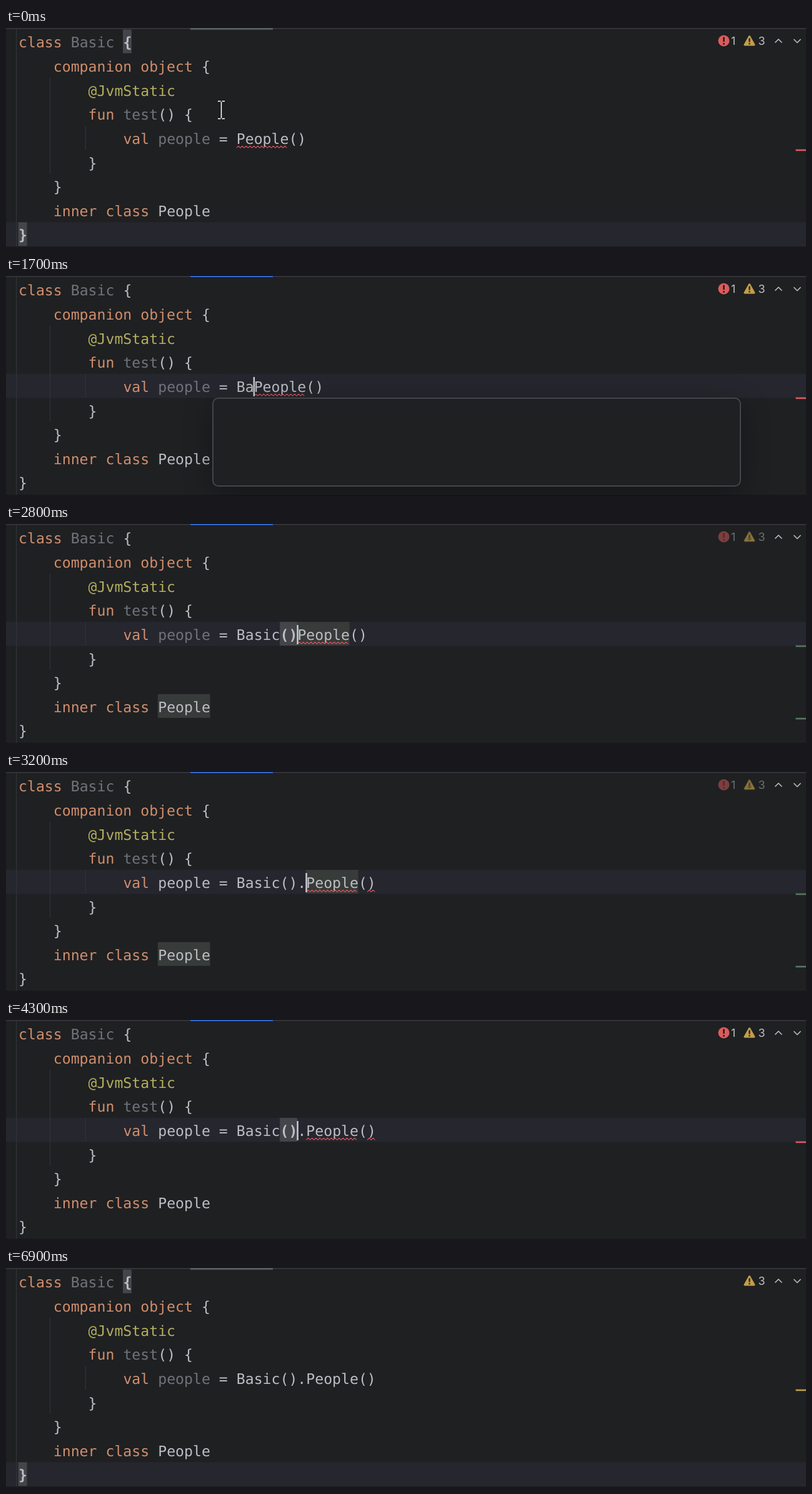
An HTML page with a canvas that plays this animation: 1280 by 353 pixels, repeating every 7 s.

```html
<!DOCTYPE html>
<html lang="en">
<head>
<meta charset="utf-8">
<title>Code editor</title>
<style>
  html, body { margin: 0; width: 100%; height: 100%; overflow: hidden; background: #1f2022; }
  canvas { display: block; width: 100%; height: 100%; }
</style>
</head>
<body>
<canvas id="stage" width="1280" height="353"></canvas>
<script>
const ctx = document.getElementById('stage').getContext('2d');
const W = 1280, H = 353, LOOP = 7000, STEP = 100;
const CHAR = 13.95, LEFT = 20, LINE = 38.66, TOP = 2.4;
const MONO = '23.17px "DejaVu Sans Mono", monospace';
const UI = 'Inter, sans-serif';
const C = {
  bg: '#1f2022', row: '#26262e', text: '#bcbec4', keyword: '#cf8e6d', note: '#b3ae60',
  muted: '#6f737a', guide: '#313438', match: '#43454a', usage: '#373b39', blue: '#548af7',
  red: '#db5c5c', yellow: '#c29e4a', green: '#57765f', popup: '#2b2d30'
};

// Each entry changes the editor state from its time on.
const timeline = [
  [0, { typed: '', row: 8, caret: null, braces: true, focus: false, tab: 2.7, usages: false, parens: false,
        light: false, error: true, dim: false, popup: null, mouse: [344.5, 131.5] }],
  [100, { mouse: [352, 146] }],
  [200, { mouse: [366, 168] }],
  [300, { mouse: [373, 179] }],
  [500, { row: 4, caret: 25, braces: false, focus: true }],
  [700, { usages: true }],
  [1100, { typed: 'B', caret: 26, tab: 1.6, usages: false, mouse: null }],
  [1500, { typed: 'Ba', caret: 27 }],
  [1700, { popup: 'empty' }],
  [1800, { popup: 'classes' }],
  [1900, { typed: 'Bas', caret: 28 }],
  [2000, { typed: 'Basi', caret: 29 }],
  [2100, { typed: 'Basic', caret: 30 }],
  [2300, { typed: 'Basic()', caret: 32, popup: null }],
  [2500, { dim: true }],
  [2700, { parens: true, usages: true }],
  [3100, { typed: 'Basic().', caret: 33, parens: false }],
  [3200, { light: true }],
  [3300, { popup: 'members' }],
  [3800, { caret: 34 }],
  [4000, { popup: null }],
  [4100, { caret: 32, dim: false }],
  [4300, { usages: false, parens: true }],
  [4500, { caret: 31 }],
  [4800, { light: false, error: false, errorCount: true, tab: 2.7 }],
  [5000, { errorCount: false }],
  [5200, { mouse: [345, 212] }],
  [5300, { mouse: [268, 297] }],
  [5400, { mouse: [400, 332] }],
  [5500, { mouse: [545, 343], row: 8, caret: 1, parens: false, braces: true }],
  [5600, { mouse: [582, 344] }],
  [5900, { mouse: [545, 347] }],
  [6000, { mouse: [497, 352] }],
  [6100, { mouse: null }],
  [6600, { caret: null }],
  [6900, { focus: false }]
];

const colX = col => LEFT + col * CHAR;
const rowY = row => TOP + row * LINE;

function rect(x, y, w, h, color) {
  ctx.fillStyle = color;
  ctx.fillRect(x, y, w, h);
}

function rounded(x, y, w, h, r, color) {
  ctx.beginPath();
  ctx.roundRect(x, y, w, h, r);
  ctx.fillStyle = color;
  ctx.fill();
}

function disc(x, y, r, color) {
  ctx.beginPath();
  ctx.arc(x, y, r, 0, Math.PI * 2);
  ctx.fillStyle = color;
  ctx.fill();
}

function line(points, color, width) {
  ctx.beginPath();
  points.forEach(([x, y]) => ctx.lineTo(x, y));
  ctx.strokeStyle = color;
  ctx.lineWidth = width;
  ctx.stroke();
}

function text(str, x, y, color, font = MONO, align = 'left') {
  ctx.font = font;
  ctx.textAlign = align;
  ctx.fillStyle = color;
  ctx.fillText(str, x, y);
}

const bold = (str, x, y, color) => text(str, x, y, color, 'bold ' + MONO);

// Draws [text, color] pairs one after another on the character grid.
function code(row, col, ...tokens) {
  for (const [str, color = C.text] of tokens) {
    text(str, colX(col), rowY(row) + 28.8, color);
    col += str.length;
  }
}

function cellBox(row, col, count, color) {
  rect(colX(col) - 0.4, rowY(row), count * CHAR, LINE - 0.6, color);
}

function matched(row, col, str) {
  cellBox(row, col, str.length, C.match);
  bold(str, colX(col), rowY(row) + 28.8, C.text);
}

function squiggle(col, count) {
  const start = colX(col), end = start + count * CHAR, points = [];
  for (let x = start, i = 0; x <= end; x += 3.1, i++) points.push([x, i % 2 ? 189.3 : 192.3]);
  line(points, '#d9565f', 1.1);
}

function drawCode(s) {
  const target = 25 + s.typed.length;
  rect(0, rowY(s.row), W, LINE, C.row);
  rect(16, 0, 1.2, H, C.guide);
  rect(70, 80, 1.2, 154, C.guide);
  rect(126.5, 157, 1.2, 38, C.guide);
  if (s.usages) {
    cellBox(4, target, 6, C.usage);
    cellBox(7, 16, 6, C.usage);
  }
  code(0, 0, ['class ', C.keyword], ['Basic ', C.muted], [s.braces ? '' : '{']);
  code(1, 4, ['companion object ', C.keyword], ['{']);
  code(2, 8, ['@JvmStatic', C.note]);
  code(3, 8, ['fun ', C.keyword], ['test', C.muted], ['() {']);
  code(4, 12, ['val ', C.keyword], ['people', s.light ? C.text : C.muted], [' = ']);
  if (s.parens) {
    code(4, 25, ['Basic']);
    matched(4, 30, '()');
    code(4, 32, [s.typed.slice(7) + 'People()']);
  } else {
    code(4, 25, [s.typed + 'People()']);
  }
  code(5, 8, ['}']);
  code(6, 4, ['}']);
  code(7, 4, ['inner class ', C.keyword], ['People']);
  if (s.braces) {
    matched(0, 12, '{');
    matched(8, 0, '}');
  } else {
    code(8, 0, ['}']);
  }
  if (s.error) {
    squiggle(target, 6);
    if (s.light) squiggle(target + 7, 1);
  }
  if (s.caret !== null) rect(colX(s.caret) - 1, rowY(s.row) + 5, 2.4, 31, '#ced0d6');
}

function drawChrome(s) {
  rect(0, 0, W, 1.5, '#393b40');
  rect(295, 0, 132, s.tab, s.focus ? '#3574f0' : '#5a5d63');
  rect(0, 351, W, 2, '#1c1719');

  ctx.globalAlpha = s.dim ? 0.5 : 1;
  const count = '18px ' + UI;
  if (s.error || s.errorCount) {
    disc(1148.5, 20.5, 9, C.red);
    rect(1147.2, 14.5, 2.6, 7.5, C.bg);
    rect(1147.2, 24, 2.6, 2.6, C.bg);
    text('1', 1160, 27.3, C.text, count);
  }
  ctx.lineJoin = 'round';
  ctx.beginPath();
  [[1189.5, 13.5], [1197, 27], [1182, 27]].forEach(([x, y]) => ctx.lineTo(x, y));
  ctx.closePath();
  ctx.fillStyle = ctx.strokeStyle = C.yellow;
  ctx.lineWidth = 3;
  ctx.fill();
  ctx.stroke();
  rect(1188.4, 16.5, 2.3, 6, C.bg);
  rect(1188.4, 24, 2.3, 2.3, C.bg);
  text('3', 1203.5, 27.3, C.text, count);
  ctx.globalAlpha = 1;
  line([[1230.5, 23.5], [1236, 18], [1241.5, 23.5]], C.text, 1.6);
  line([[1260.5, 18], [1266, 23.5], [1271.5, 18]], C.text, 1.6);

  rect(1263.5, 194.7, 16.5, 2.6, s.usages ? C.green : s.error ? C.red : C.yellow);
  if (s.usages) rect(1263.5, 311, 16.5, 2.6, C.green);
}

function classIcon(x, y) {
  ctx.beginPath();
  ctx.arc(x, y, 9.3, 0, Math.PI * 2);
  ctx.fillStyle = '#25324d';
  ctx.fill();
  ctx.strokeStyle = C.blue;
  ctx.lineWidth = 1.7;
  ctx.stroke();
  ctx.beginPath();
  ctx.arc(x, y, 4.3, 0.8, Math.PI * 2 - 0.8);
  ctx.stroke();
  rect(x + 2.5, y + 2.5, 10, 10, C.match);
  rect(x + 4, y + 4, 7, 7, '#a571e6');
}

function libraryIcon(x, y) {
  ctx.beginPath();
  [[0, -11], [9, -11], [9, 0], [-6, 0], [-6, -5]].forEach(([dx, dy]) => ctx.lineTo(x + dx, y + dy));
  ctx.fillStyle = '#9a9da3';
  ctx.fill();
  line([[x - 6, y - 4], [x + 1, y - 4], [x + 1, y - 11]], C.popup, 1.5);
  rect(x - 10, y, 21, 11, '#3b86a8');
  text('01', x, y + 9.5, '#1c303b', 'bold 10px "DejaVu Sans Mono", monospace', 'center');
}

function stampIcon(x, y) {
  ctx.beginPath();
  ctx.arc(x, y - 5, 3.8, 2.2, Math.PI * 2 + 0.9);
  ctx.strokeStyle = '#ced0d6';
  ctx.lineWidth = 1.7;
  ctx.stroke();
  line([[x - 2.2, y - 2], [x - 2.2, y + 1.5], [x - 8.5, y + 1.5], [x - 8.5, y + 5],
        [x + 8.5, y + 5], [x + 8.5, y + 1.5], [x + 2.2, y + 1.5], [x + 2.2, y - 2]], '#ced0d6', 1.7);
  line([[x - 9.5, y + 8.5], [x + 9.5, y + 8.5]], '#ced0d6', 1.7);
}

function panel(x, y, w, h, color) {
  ctx.save();
  ctx.shadowColor = 'rgba(0,0,0,0.35)';
  ctx.shadowBlur = 45;
  ctx.shadowOffsetY = 10;
  rounded(x, y, w, h, 9, color);
  ctx.restore();
  ctx.strokeStyle = C.match;
  ctx.lineWidth = 2;
  ctx.stroke();
}

const TAIL_GAP = 2.5;

function classPopup(prefix, filled) {
  panel(331, 196, 844, filled ? 400 : 141, filled ? C.popup : C.bg);
  if (!filled) return;
  rounded(335, 200.5, 835, 34.5, 6, C.match);
  rect(1162, 201, 12, 61, '#4e5053');
  const items = ['Basic (<root>)', 'BasicStroke (java.awt)', 'BasicPermission (java.security)',
    'BasicFileAttributes (java.nio.file.attribute)', 'BasicBorders (javax.swing.plaf.basic)'];
  items.forEach((item, i) => {
    const [name, origin] = item.split(' '), y = 226.5 + i * 34.5, n = prefix.length;
    if (i) libraryIcon(358.5, y - 8.5); else classIcon(357.5, y - 9);
    text(name.slice(0, n), 375, y, C.blue);
    text(name.slice(n), 375 + n * CHAR, y, C.text);
    text(origin, 375 + (name.length + 1) * CHAR + TAIL_GAP, y, C.muted);
  });
}

function memberPopup(hasPrefix) {
  panel(442, 196, 860, 107, C.popup);
  rounded(446, 200.5, 850, 34.5, 6, C.match);
  classIcon(469.5, 217.5);
  bold('P', 486.5, 226.5, hasPrefix ? C.blue : C.text);
  bold('eople', 486.5 + CHAR, 226.5, C.text);
  text('()', 486.5 + 6 * CHAR + TAIL_GAP, 226.5, C.muted);
  text('Basic.People', 1262, 226.5, C.muted, MONO, 'right');
  stampIcon(469.5, 252.5);
  text('par', 486.5, 261, C.text);
  text('(expr)', 1262, 261, C.muted, MONO, 'right');
  rounded(443, 270, 850, 32, [0, 0, 8, 8], '#303236');
  const hint = '17.38px ' + UI;
  text('Press Ctrl+. to choose the selected (or first) suggestion and insert a dot afterwards',
    458, 292.3, C.muted, hint);
  text('Next Tip', 1149, 292.3, C.blue, hint);
  [280, 286.5, 293].forEach(y => disc(1261, y, 1.6, '#ced0d6'));
}

function drawMouse([x, y]) {
  const beam = (color, width) => {
    line([[x, y - 13], [x, y + 13]], color, width);
    for (const end of [-14, 14]) {
      line([[x - 5.5, y + end], [x - 1, y + end]], color, width);
      line([[x + 1, y + end], [x + 5.5, y + end]], color, width);
    }
  };
  beam('#08090a', 4);
  beam('#f4f4f4', 1.8);
}

function render(time) {
  const now = Math.floor((time % LOOP) / STEP) * STEP;
  const state = Object.assign({}, ...timeline.filter(([at]) => at <= now).map(([, change]) => change));
  ctx.textRendering = 'geometricPrecision';
  rect(0, 0, W, H, C.bg);
  drawCode(state);
  drawChrome(state);
  if (state.popup === 'members') memberPopup(state.caret === 34);
  else if (state.popup) classPopup(state.typed, state.popup === 'classes');
  if (state.mouse) drawMouse(state.mouse);
}

let start;
function tick(now) {
  start ??= now;
  render(Math.max(0, now - start));
  requestAnimationFrame(tick);
}
render(0);
requestAnimationFrame(tick);
</script>
</body>
</html>
```
